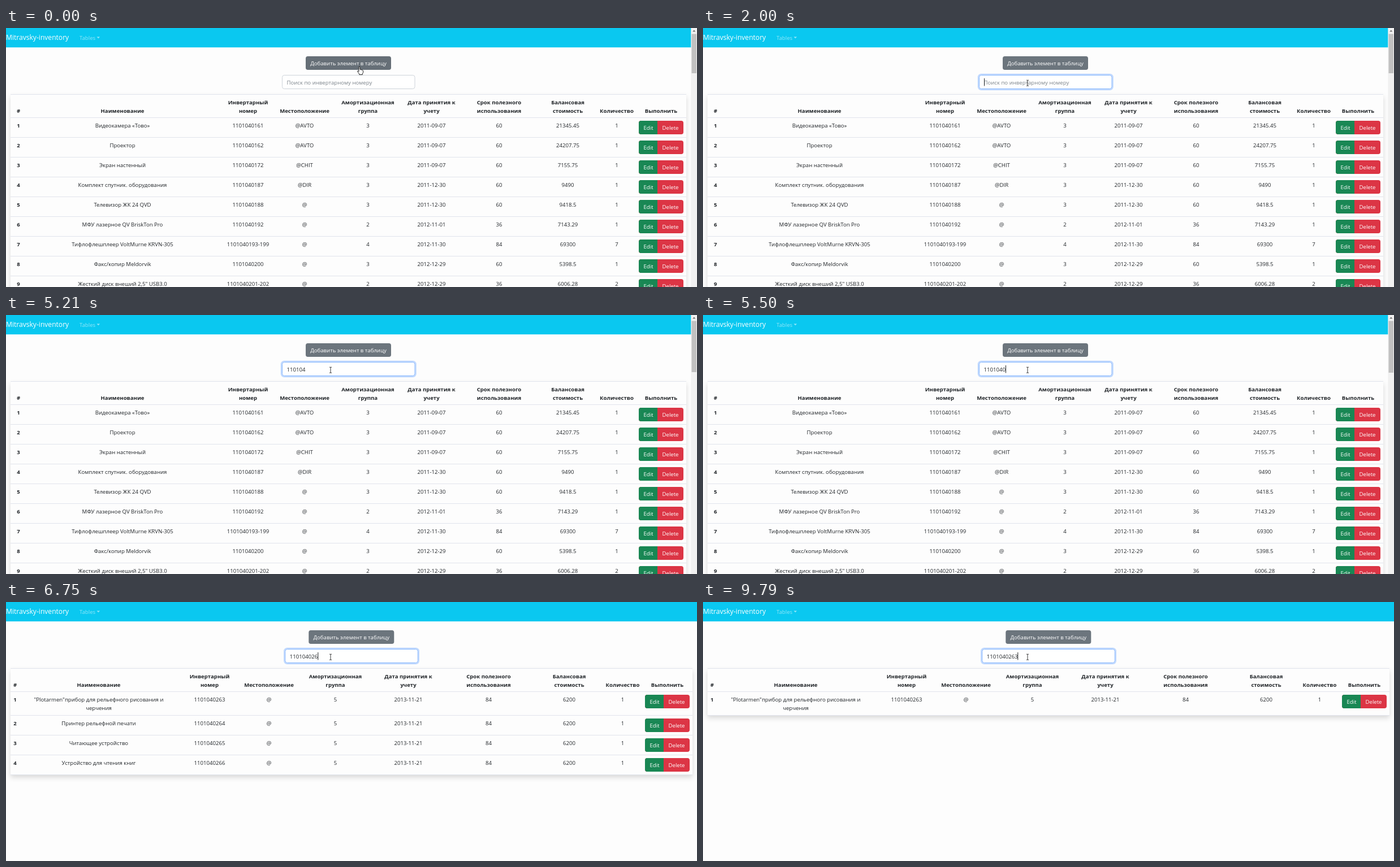
An HTML page for the animation above (9.83 s loop, 1222 by 458 pixels).

```html
<!DOCTYPE html>
<html lang="ru">
<head>
<meta charset="utf-8">
<title>Inventory search</title>
<style>
html, body { margin: 0; width: 100%; height: 100%; overflow: hidden; background: #fdfdfd; }
svg { display: block; width: 1222px; height: 458px; }
text { font: 9.6px "Open Sans", "Noto Sans", sans-serif; fill: #212529; white-space: pre; }
.mid { text-anchor: middle; }
.bold { font-weight: 700; }
.white { fill: #fff; }
.line { fill: #e1e4ec; }
.card { fill: #fdfdfd; filter: drop-shadow(0 5px 5px rgba(0, 0, 0, .15)); }
</style>
</head>
<body>
<svg id="stage" viewBox="0 0 1222 458" xmlns="http://www.w3.org/2000/svg"></svg>
<script>
const LOOP = 9830, BLINK = 540, DIGIT = 5.49;
const QUERY = "1101040263";
// time of the key press, length of the typed text, lower end of the scroll thumb
const KEYS = [
  [710, 0, 80], [2250, 1, 81], [2500, 2, 82], [2990, 2, 82], [4000, 3, 84], [4250, 4, 90],
  [4420, 5, 100], [4660, 6, 101], [5340, 7, 102], [5660, 8, 378], [6460, 9, 0], [7585, 10, 0]
];
const HEAD = ["#", "Наименование", "Инвертарный|номер", "Местоположение", "Амортизационная|группа",
  "Дата принятия к|учету", "Срок полезного|использования", "Балансовая|стоимость", "Количество", "Выполнить"];

const fax = "Факс/копир Meldorvik;1101040200;@;3;2012-12-29;60;5398.5;1";
const disk = "Жесткий диск внеший 2,5\" USB3.0;1101040201-202;@;2;2012-12-29;36;6006.28;2";
const plotter = "\"Plotarmen\"прибор для рельефного рисования и|черчения;1101040263;@;5;2013-11-21;84;6200;1";
const ALL = [
  "Видеокамера «Тово»;1101040161;@AVTO;3;2011-09-07;60;21345.45;1",
  "Проектор;1101040162;@AVTO;3;2011-09-07;60;24207.75;1",
  "Экран настенный;1101040172;@CHIT;3;2011-09-07;60;7155.75;1",
  "Комплект спутник. оборудования;1101040187;@DIR;3;2011-12-30;60;9490;1",
  "Телевизор ЖК 24 QVD;1101040188;@;3;2011-12-30;60;9418.5;1",
  "МФУ лазерное QV BriskTon Pro;1101040192;@;2;2012-11-01;36;7143.29;1",
  "Тифлофлешплеер VoltMurne KRVN-305;1101040193-199;@;4;2012-11-30;84;69300;7",
  fax, disk
];
const SOME = [
  fax, disk,
  "Компьютер NUR, k7-2160 3.1 ГГц;1101040203;@;2;2012-12-29;36;23583.06;1",
  "Компьютер NUR,Quarden T640;1101040204;@;2;2012-12-29;36;12532.02;1",
  "Монитор ЖК 22\" VD Plenric;1101040205;@;2;2012-12-29;36;5940.27;1",
  "МФУ лазерное Norvika U-Bureau;1101040206;@;3;2012-12-29;36;21120.96;1",
  "Сплит-система Velmix TN-04;1101040242;@;4;2013-08-02;84;15000;1",
  "Компьютер\"ОрТак 315\";1101040245;@;2;2013-09-02;36;47150;1",
  "Микшерный пульт Tavoma PD-46LN с ПО;1101040246;@AVTO;3;2013-09-02;36;27500;1"
];
const FEW = [
  plotter,
  "Принтер рельефной печати;1101040264;@;5;2013-11-21;84;6200;1",
  "Читающее устройство;1101040265;@;5;2013-11-21;84;6200;1",
  "Устройство для чтения книг;1101040266;@;5;2013-11-21;84;6200;1"
];
const COLS_ALL = [22, 206, 428, 528, 640, 752.5, 872, 993.5, 1080, 1158.5];
const COLS_SOME = [19, 167, 360, 465, 581.5, 707.5, 847, 986.5, 1080, 1158.5];
const COLS_FEW = [16, 164, 360, 465, 582.5, 711.5, 853.5, 996, 1090.5, 1169.5];

const stage = document.getElementById("stage");

function add(tag, attrs, parent = stage, content) {
  const el = document.createElementNS("http://www.w3.org/2000/svg", tag);
  for (const k in attrs) el.setAttribute(k, attrs[k]);
  if (content !== undefined) el.textContent = content;
  parent.appendChild(el);
  return el;
}
const rect = (x, y, width, height, attrs, parent) => add("rect", { x, y, width, height, ...attrs }, parent);
// y is the middle of the capitals
const label = (str, x, y, cls, parent) => add("text", { x, y: y + 3.5, class: cls }, parent, str);
const show = (el, on) => el.setAttribute("visibility", on ? "visible" : "hidden");

function buttons(x, y, parent) {
  rect(x, y, 79, 24, { rx: 4, fill: "#dc3545" }, parent);
  add("path", { d: `M${x + 33} ${y}h-29a4 4 0 0 0 -4 4v16a4 4 0 0 0 4 4h29z`, fill: "#198754" }, parent);
  label("Edit", x + 17, y + 12, "mid white", parent);
  label("Delete", x + 56, y + 12, "mid white", parent);
}

function table(cols, rows, right) {
  const g = add("g", {});
  const heights = rows.map(r => r.includes("|") ? 42 : 35);
  const bottom = 158 + heights.reduce((a, b) => a + b, 0);
  rect(8, 117, right - 8, bottom - 117, { class: "card" }, g);
  rect(8, 117, right - 8, 1, { class: "line" }, g);
  rect(8, 158, right - 8, 1, { class: "line" }, g);
  HEAD.forEach((h, i) => {
    const parts = h.split("|");
    parts.forEach((p, k) => label(p, cols[i], 146 - 15 * (parts.length - 1 - k), "mid bold", g));
  });
  let y = 158;
  rows.forEach((row, n) => {
    label(n + 1, cols[0], y + 14, "mid bold", g);
    row.split(";").forEach((cell, i) =>
      cell.split("|").forEach((p, k) => label(p, cols[i + 1], y + 14 + 15.3 * k, "mid", g)));
    buttons(right - 84, y + 6, g);
    y += heights[n];
    rect(8, y, right - 8, 1, { class: "line" }, g);
  });
  return g;
}

const tables = [
  table(COLS_ALL, ALL, 1203),
  table(COLS_SOME, SOME, 1203),
  table(COLS_FEW, FEW, 1214),
  table(COLS_FEW, [plotter], 1214)
];

// navigation bar
rect(0, 0, 1222, 34.3, { fill: "#0ac8f0" });
label("Mitravsky-inventory", 0, 17, "white").style.fontSize = "12.1px";
label("Tables", 130, 17, "white").style.opacity = .55;
add("path", { d: "M160.5 15.5h5.6l-2.8 2.9z", fill: "#fff", opacity: .55 });

// button and search field
const form = add("g", {});
const addBtn = rect(530, 50, 151, 24, { rx: 3.8 }, form);
label("Добавить элемент в таблицу", 605.5, 62, "mid white", form);
const ring = rect(487, 82, 237.5, 27, { rx: 5, fill: "none", stroke: "#0d6efd", "stroke-opacity": .25, "stroke-width": 2.5 }, form);
const field = rect(488.5, 83.5, 234.5, 24, { rx: 3.8, fill: "#fff" }, form);
const hint = label("Поиск по инвертарному номеру", 496.5, 96, "", form);
hint.style.fill = "#7b838a";
const typed = label("", 496.5, 96, "", form);
const caret = rect(0, 89, 1, 13.5, { fill: "#212529" }, form);

// scroll bar
const bar = add("g", {});
rect(1211.3, 0, 11, 458, { fill: "#f1f1f1" }, bar);
add("path", { d: "M1214.2 6.4l2.6-3 2.6 3z", fill: "#707070" }, bar);
const thumb = rect(1212.5, 10.5, 8.5, 70, { fill: "#c1c1c1" }, bar);

// pointers, each with its hot spot at 0,0
const hand = add("path", {
  d: "M-1 0.8q1-1.4 2 0v4.4l1.3.2 1 .5 1.2.1.7.6 1 .4.4.8v3l-1.3 2.2v1.4h-5.6v-1.3l-3.2-4.3q.2-1.6 1.6-.7l.9 1z",
  fill: "#fff", stroke: "#111", "stroke-width": .9, "stroke-linejoin": "round"
});
const arrow = add("path", { d: "M0 0v11l2.6-2.4 1.7 3.8 1.5-.7-1.7-3.7h3.6z", fill: "#fff", stroke: "#111", "stroke-width": .8 });
const beam = add("path", { d: "M-2-5h1.4q.6 0 .6.8v8.4q0 .8-.6.8h-1.4M2-5h-1.4q-.6 0-.6.8M2 5h-1.4q-.6 0-.6-.8", fill: "none", stroke: "#222", "stroke-width": .9 });

const clamp = v => Math.min(1, Math.max(0, v));
const ease = v => v * v * (3 - 2 * v);
const mix = (a, b, p) => a.map((v, i) => Math.round(v + (b[i] - v) * p));

function drawPointer(t) {
  const p = ease(clamp((t - 30) / 620));
  const x = 625 - 51 * p, y = 68 + 29.3 * p;
  const current = y < 74 ? hand : y < 84 ? arrow : beam;
  for (const c of [hand, arrow, beam]) show(c, c === current);
  current.setAttribute("transform", `translate(${x.toFixed(2)} ${y.toFixed(2)})`);
  addBtn.setAttribute("fill", `rgb(${mix([102, 111, 119], [108, 117, 125], clamp((t - 310) / 150))})`);
}

function draw(t) {
  const key = KEYS.filter(k => k[0] <= t).pop();
  const len = key ? key[1] : 0;
  const wide = len > 8;

  const state = Math.max(0, len - 7);
  tables.forEach((g, i) => show(g, i === state));
  show(bar, !wide);
  if (!wide) thumb.setAttribute("height", (key ? key[2] : 80) - 10.5);
  form.setAttribute("transform", `translate(${wide ? 5.3 : 0} 0)`);

  const focus = clamp((t - KEYS[0][0]) / 150);
  ring.setAttribute("opacity", focus);
  field.setAttribute("stroke", `rgb(${mix([206, 212, 218], [134, 183, 254], focus)})`);

  show(hint, len === 0);
  typed.textContent = QUERY.slice(0, len);
  caret.setAttribute("x", Math.round(496.5 + len * DIGIT));
  show(caret, key && Math.floor((t - key[0]) / BLINK) % 2 === 0);

  drawPointer(t);
}

const start = performance.now();
function tick() {
  draw((performance.now() - start) % LOOP);
  requestAnimationFrame(tick);
}
tick();
</script>
</body>
</html>
```
